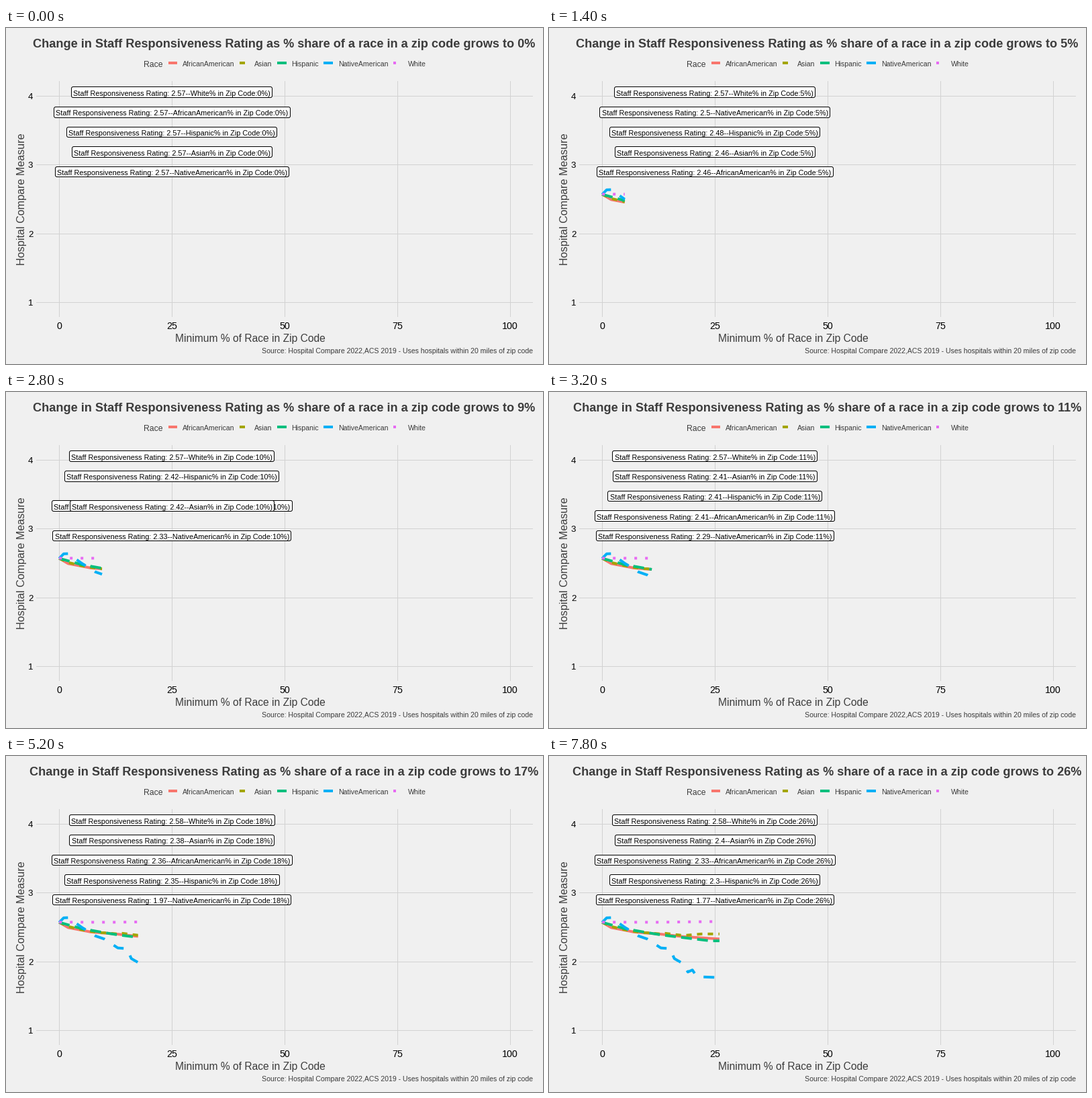
Write a matplotlib script that moves like this. It is 800x500 px and loops after 8 s.

```python
import math

import matplotlib.pyplot as plt
import numpy as np
from matplotlib.animation import FuncAnimation
from matplotlib.patches import FancyBboxPatch

W, H, DPI = 800, 500, 100
FRAMES, INTERVAL = 40, 200
PT = 72 / DPI
DARK, GRID, PAPER = "#3C3C3C", "#D2D2D2", "#F0F0F0"

plt.rcParams["font.family"] = "Liberation Sans"

# name, colour, dash pattern, turning points (share, rating)
SERIES = [
    ("AfricanAmerican", "#F8766D", "-",
     [(0, 2.573), (2, 2.495), (5, 2.458), (7, 2.432), (13, 2.4), (18, 2.364),
      (26, 2.33)]),
    ("Asian", "#A3A500", (0, (2, 2)),
     [(0, 2.571), (2, 2.512), (5, 2.463), (9, 2.42), (10, 2.42), (13, 2.402),
      (14, 2.412), (18, 2.38), (22, 2.403)]),
    ("Hispanic", "#00BF7D", (0, (4, 2)),
     [(0, 2.572), (5, 2.48), (10, 2.422), (13, 2.39), (18, 2.35),
      (24, 2.303)]),
    ("NativeAmerican", "#00B0F6", (0, (4, 4)),
     [(0, 2.57), (1, 2.637), (2, 2.64), (5, 2.5), (8, 2.375), (10, 2.33),
      (13, 2.2), (15, 2.19), (16, 2.045), (18, 1.97), (19, 1.85), (20, 1.88),
      (21, 1.782), (26, 1.77)]),
    ("White", "#E76BF3", (0, (1, 3)),
     [(0, 2.574), (12, 2.573), (26, 2.584)]),
]
SHARES = np.arange(27)
RATINGS = np.array([np.interp(SHARES, *zip(*s[3])) for s in SERIES])
RANKS = np.argsort(np.argsort(-RATINGS, axis=0, kind="stable"), axis=0)

fig = plt.figure(figsize=(W / DPI, H / DPI), dpi=DPI, facecolor=PAPER)
ax = fig.add_axes([0, 0, 1, 1])
ax.set_xlim(0, W)
ax.set_ylim(H, 0)
ax.axis("off")


def x_px(share):
    return 79.2 + 6.72 * share


def y_px(rating):
    return 511 - 102.45 * rating


def pixel(v):
    """Centre of the pixel that holds v."""
    return math.floor(v) + 0.5


def write(x, y, text, size, color=DARK, ha="left", **kw):
    return ax.text(x, y, text, fontsize=size * PT, color=color, ha=ha,
                   va="baseline", **kw)


def text_width(text):
    extent = text.get_window_extent(fig.canvas.get_renderer())
    return abs(extent.transformed(ax.transData.inverted()).width)


def stroke(xs, ys, color, width=4, style="-", **kw):
    return ax.plot(xs, ys, color=color, lw=width * PT, ls=style,
                   solid_capstyle="butt", dash_capstyle="butt", **kw)[0]


# grid and axis text
for share in range(0, 101, 25):
    x = pixel(x_px(share))
    stroke([x, x], [79, 430], GRID, 1, zorder=1, snap=False)
    write(x - 0.5, 448, str(share), 14.2, "black", "center")
for rating in range(1, 5):
    y = pixel(y_px(rating))
    stroke([45, 785], [y, y], GRID, 1, zorder=1, snap=False)
    write(40.3, y + 4.6, str(rating), 13.2, "black", "right")

write(364, 467, "Minimum % of Race in Zip Code", 15.65, ha="center")
write(28, 255, "Hospital Compare Measure", 16.1, ha="center",
      rotation=90, rotation_mode="anchor")
write(785, 484, "Source: Hospital Compare 2022,ACS 2019 - "
      "Uses hospitals within 20 miles of zip code", 10.52, ha="right")
title = write(414.3, 29, "", 18.2, ha="center", weight="bold")

# legend: each key follows the text before it
write(204.8, 58, "Race", 12.3)
key = 241.5
for name, color, style, _ in SERIES:
    stroke([key, key + 13.8], [52, 52], color, style=style)
    entry = write(key + 21.6, 57, name, 10.5)
    key += 29.2 + text_width(entry)

lines, tags = [], []
for k, (name, color, style, _) in enumerate(SERIES):
    lines.append(stroke([], [], color, style=style, zorder=3 + 0.1 * k))
    box = FancyBboxPatch(
        (0, 0), 1, 1, boxstyle="round,pad=0,rounding_size=2.6",
        fc="white", ec="black", lw=PT, zorder=5 + k)
    ax.add_patch(box)
    tags.append((box, write(247.2, 0, "", 10.93, "black", "center",
                            zorder=5.5 + k)))


def reveal(i):
    """Share reached: two whole steps and one half step per three frames."""
    return 2 * (i // 3) + (0, 1, 1.5)[i % 3]


def draw(i):
    share = reveal(i)
    top = math.ceil(share)
    title.set_text("Change in Staff Responsiveness Rating as % share of a race "
                   f"in a zip code grows to {round(100 * i / 149)}%")
    xs = np.append(SHARES[SHARES < share], share)
    for k, (line, (box, text)) in enumerate(zip(lines, tags)):
        line.set_data(x_px(xs), y_px(np.interp(xs, SHARES, RATINGS[k])))
        mid = 95.7 + 29.55 * np.interp(share, SHARES, RANKS[k])
        text.set_text(f"Staff Responsiveness Rating: {round(RATINGS[k, top], 2):g}"
                      f"--{SERIES[k][0]}% in Zip Code:{top}%)")
        text.set_y(mid + 5.2)
        half = text_width(text) / 2 + 2.7
        left, right = pixel(247.3 - half), pixel(247.3 + half)
        upper, lower = pixel(mid - 7.75), pixel(mid + 7.75)
        box.set_bounds(left, upper, right - left, lower - upper)
    return [title, *lines]


anim = FuncAnimation(fig, draw, frames=FRAMES, interval=INTERVAL,
                     repeat=True, repeat_delay=0, blit=False)
plt.show()
```
